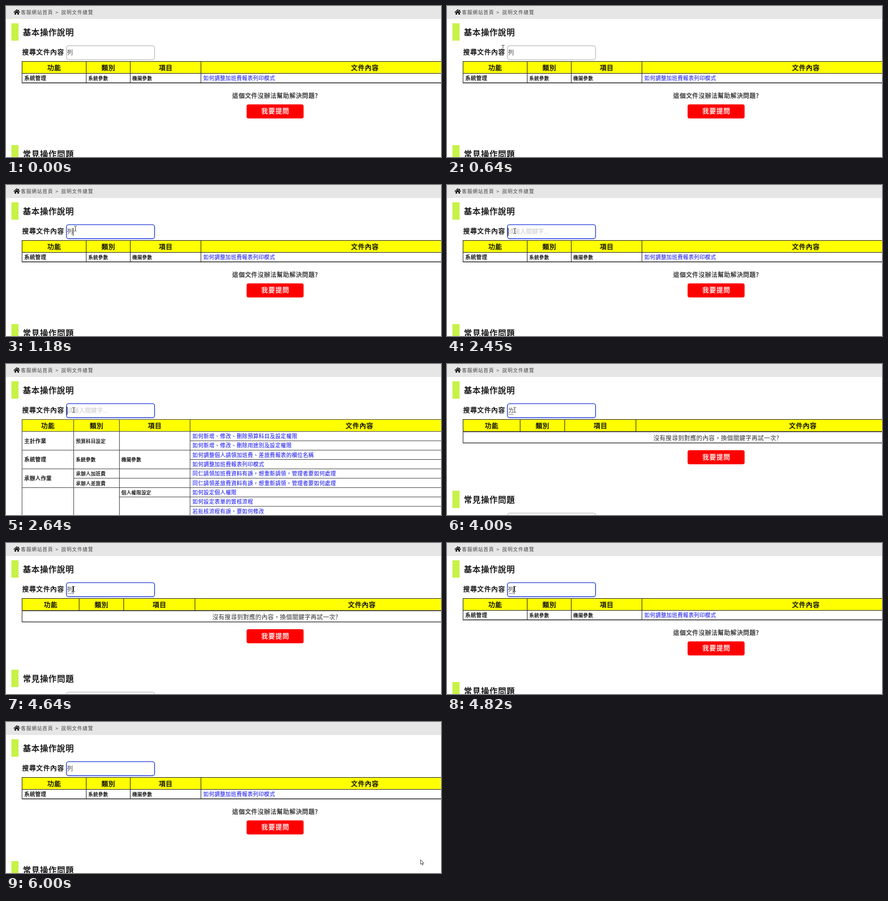
An HTML page for the animation above (6.09 s loop, 800 by 279 pixels).

```html
<!DOCTYPE html>
<html lang="zh-Hant">
<head>
<meta charset="utf-8">
<style>
html, body { margin: 0; width: 100%; height: 100%; overflow: hidden; background: #fff; }
svg { display: block; }
text { font-family: "Noto Sans CJK TC", "Noto Sans TC", "Noto Sans CJK", sans-serif; white-space: pre; }
.grid { fill: none; }
</style>
</head>
<body>
<svg id="stage" width="800" height="279" viewBox="0 0 800 279"></svg>
<script>
const LOOP = 6090, LEFT = 29.5, EDGE = 961;

// Text with a character pitch; `bold` thickens the strokes a little.
function text(s, x, y, size, { pitch = size, fill = '#111', bold = 0, mid = false, id = '' } = {}) {
  const gap = pitch - size;
  return `<text ${id && `id="${id}"`} x="${mid ? x + gap / 2 : x}" y="${y}" font-size="${size}" letter-spacing="${gap}"
    fill="${fill}" stroke="${fill}" stroke-width="${bold}" ${mid ? 'text-anchor="middle"' : ''}>${s}</text>`;
}
const rect = (x, y, w, h, fill, more = '') =>
  `<rect x="${x}" y="${y}" width="${w}" height="${h}" fill="${fill}" ${more}/>`;
const hline = (y, x = LEFT) => `M${x} ${y}H800`;
const grid = (d, color = '#222') => `<path class="grid" d="${d}" stroke="${color}"/>`;

const section = (title, y) => rect(10, y, 13, 32, '#c7f247') +
  text(title, 31, y + 22, 15, { pitch: 15.7, bold: 0.35, fill: '#000' });
const cell = (s, x, y) => text(s, x, y, 9.8, { pitch: 10.15, bold: 0.25, fill: '#000' });
const small = (s, x, y) => text(s, x, y, 8.8, { pitch: 9.15, bold: 0.2, fill: '#000' });
const link = (s, x, y) => text(s, x, y, 9.8, { pitch: 10.15, bold: 0.08, fill: '#2020ee' });

function header(cols) {
  const ends = [...cols.slice(1), EDGE];
  return rect(LEFT, 102.5, 771, 22, '#ff0') + ['功能', '類別', '項目', '文件內容'].map((s, i) =>
    text(s, (cols[i] + ends[i]) / 2, 118.7, 12.2, { pitch: 12.8, bold: 0.35, mid: true, fill: '#000' })).join('');
}
const button = y => rect(442.5, y, 104.8, 26, '#f00', 'rx="3.5"') +
  text('我要提問', 495, y + 17.3, 12.1, { pitch: 12.9, bold: 0.3, fill: '#fff', mid: true });

function matchView() {
  const cols = [LEFT, 147.5, 228.5, 358.5];
  return header(cols) +
    grid(hline(102.5) + hline(124.5) + hline(141.8) + cols.map(x => `M${x} 102V143`).join('')) +
    rect(29, 142, 771, 1, '#555') +
    cell('系統管理', 33.5, 137) + small('系統參數', 151.3, 137) + small('機關參數', 232.3, 137) +
    link('如何調整加班費報表列印模式', 363, 137) +
    text('這個文件沒辦法幫助解決問題?', 416, 170, 11.2, { pitch: 11.7, bold: 0.25, fill: '#222' }) +
    button(181.8) + section('常見操作問題', 257);
}

function emptyView() {
  const cols = [LEFT, 134.5, 216.5, 347.5];
  return header(cols) +
    grid(hline(102.5) + hline(124.7) + hline(145.7) + cols.map((x, i) => `M${x} 102V${i ? 125 : 146}`).join('')) +
    rect(29, 125, 771, 1, '#555') + rect(29, 146, 771, 0.6, '#777') +
    text('沒有搜尋到對應的內容，換個關鍵字再試一次?', 379.5, 140.5, 11, { pitch: 11.3, fill: '#333' }) +
    button(159.3) + section('常見操作問題', 234.2) +
    rect(111.2, 275.5, 162.3, 26, '#fff', 'rx="4" stroke="#aaa"');
}

function fullView() {
  const cols = [LEFT, 124.5, 208.5, 338.5];
  const edge = r => 124.6 + 17.3 * r;
  const base = r => 137 + 17.35 * r;
  const lineStart = [0, 3, 0, 3, 0, 1, 0, 2, 3];
  const links = ['如何新增、修改、刪除預算科目及設定權限', '如何新增、修改、刪除用途別及設定權限',
    '如何調整個人請領加班費、差旅費報表的欄位名稱', '如何調整加班費報表列印模式',
    '同仁請領加班費資料有誤，想重新請領，管理者要如何處理',
    '同仁請領差旅費資料有誤，想重新請領，管理者要如何處理',
    '如何設定個人權限', '如何設定表單的簽核流程', '若批核流程有誤，要如何修改'];
  return header(cols) +
    grid(hline(102.5) + lineStart.map((c, r) => hline(edge(r), cols[c])).join('') +
      cols.map(x => `M${x} 102V279`).join(''), '#444') +
    links.map((s, r) => link(s, 343, base(r))).join('') +
    ['主計作業', '系統管理', '承辦人作業'].map((s, i) => cell(s, 33.5, base(2 * i + 0.5))).join('') +
    small('預算科目設定', 128.5, base(0.5)) + small('系統參數', 128.5, base(2.5)) +
    small('機關參數', 212.3, base(2.5)) + small('承辦人加班費', 128.5, base(4)) +
    small('承辦人差旅費', 128.5, base(5)) + small('個人權限設定', 212.3, base(6));
}

const crumb = { pitch: 9.9, fill: '#444' };
const stage = document.getElementById('stage');
stage.innerHTML =
  rect(0, 0, 800, 24, '#e6e6e6') +
  `<path d="M14.3 12L19.8 7L25.3 12" fill="none" stroke="#111" stroke-width="1.5"/>
   <path d="M22.4 7H24V10L22.4 8.5ZM19.8 8.8L23.8 12.4V16H21V13H18.6V16H15.8V12.4Z" fill="#111"/>` +
  text('客服網站首頁', 27.5, 14.5, 8.8, crumb) + text('&gt;', 91, 14.5, 8.8, crumb) +
  text('說明文件總覽', 101.5, 14.5, 8.8, crumb) +
  section('基本操作說明', 32) +
  text('搜尋文件內容', 29.8, 90, 12.2, { pitch: 12.9, bold: 0.3, fill: '#000' }) +
  rect(111.2, 73.4, 162.1, 25.8, '#fff', 'id="box" rx="4"') +
  text('', 112.3, 90.3, 11, { id: 'typed' }) +
  '<path id="under" stroke="#888"/>' +
  '<path id="caret" stroke="#222" shape-rendering="crispEdges"/>' +
  `<g id="match">${matchView()}</g><g id="empty">${emptyView()}</g><g id="full">${fullView()}</g>` +
  `<path id="arrow" d="M.5 .5V9L2.5 7.2L4 10.3L5.3 9.6L3.9 6.7H6.5Z" fill="#fff" stroke="#222" stroke-width=".8"/>
   <path id="beam" d="M-2.5 -4.5H-.7L0 -4L.7 -4.5H2.5M0 -4V4M-2.5 4.5H-.7L0 4L.7 4.5H2.5" fill="none" stroke="#333" stroke-width=".9"/>`;

// Each track holds its value from the given time until the next one.
const views = [[0, 'match'], [2640, 'full'], [4000, 'empty'], [4820, 'match']];
const words = [[0, '列'], [2450, ''], [3910, 'ㄌ'], [4270, 'ㄌㄧ'], [4360, 'ㄌㄧㄝ'], [4640, '列']];
const underlined = [[0, false], [3910, true], [4910, false]];
const carets = [[0, 0], [1180, 123.5], [1730, 0], [2270, 123.5], [2450, 112.5], [2820, 0], [3360, 112.5],
  [3910, 0], [4090, 122.5], [4270, 0], [4640, 123.5], [5450, 0]];
const pointer = [[0, ''], [90, 'arrow', 300, 189], [180, 'arrow', 206, 114], [360, 'arrow', 180, 104],
  [450, 'beam', 146, 90], [540, 'beam', 116, 80], [640, 'beam', 103, 77], [820, 'beam', 117, 78],
  [910, 'beam', 127.5, 80.5], [1450, 'beam', 126, 83], [1550, 'beam', 124.5, 85],
  [5730, 'arrow', 300, 122], [5820, 'arrow', 560, 196], [5910, 'arrow', 724, 244], [6000, 'arrow', 762, 254]];
const at = (track, t) => track.findLast(k => k[0] <= t).slice(1);

const el = id => document.getElementById(id);
const show = (id, on) => el(id).setAttribute('visibility', on ? 'visible' : 'hidden');
const set = (id, attrs) => { for (const k in attrs) el(id).setAttribute(k, attrs[k]); };

function draw(now) {
  const t = now % LOOP;
  const [view] = at(views, t), [word] = at(words, t), [caret] = at(carets, t);
  const [kind, x, y] = at(pointer, t);
  for (const id of ['match', 'empty', 'full']) show(id, id === view);

  const focused = t >= 1180;
  set('box', { stroke: focused ? '#2440d8' : '#aaa', 'stroke-width': focused ? 1.4 : 1 });
  const shown = word || '請輸入關鍵字...';
  if (el('typed').textContent !== shown) el('typed').textContent = shown;
  set('typed', { fill: word ? '#444' : '#c8c8c8', stroke: 'none' });
  set('under', { d: `M113 93.5h${word.length * 11 - 1.5}` });
  show('under', at(underlined, t)[0]);
  set('caret', { d: `M${caret} 79V94` });
  show('caret', caret);

  for (const id of ['arrow', 'beam']) show(id, id === kind);
  if (kind) set(kind, { transform: `translate(${x} ${y})` });
  requestAnimationFrame(draw);
}
draw(0);
</script>
</body>
</html>
```
